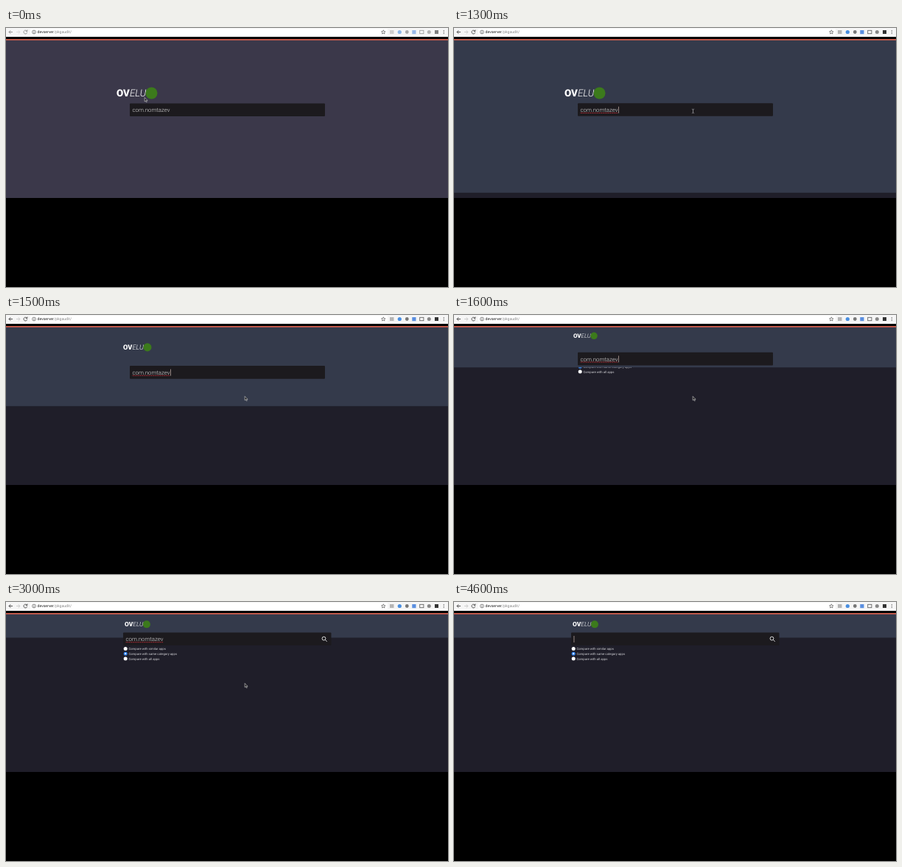
An HTML page for the animation above (5.1 s loop, 600 by 352 pixels).

```html
<!DOCTYPE html>
<html lang="en">
<head>
<meta charset="utf-8">
<title>App search</title>
<style>
  html, body { margin: 0; width: 100%; height: 100%; overflow: hidden; background: #000; }
  svg { display: block; width: 600px; height: 352px; }
  text { font-family: Roboto, "Open Sans", sans-serif; text-rendering: geometricPrecision; white-space: pre; }
  .line { fill: none; stroke: #555; stroke-width: 1; }
</style>
</head>
<body>
<svg viewBox="0 0 600 352">
  <rect width="600" height="352"/>
  <rect y="16" width="600" height="215" fill="#1f1e29"/>

  <g id="options" font-size="4.25" fill="#d4d4d8">
    <circle cy="63.5" r="2.5" fill="#fff"/>
    <text x="4.2" y="65.1">Compare with similar apps</text>
    <circle cy="70.3" r="2.5" fill="#3284ee"/>
    <circle cy="70.3" r="1" fill="#fff"/>
    <text x="4.2" y="71.9">Compare with same category apps</text>
    <circle cy="77" r="2.5" fill="#fff"/>
    <text x="4.2" y="78.6">Compare with all apps</text>
  </g>

  <rect id="panel" y="16" width="600"/>
  <rect y="15" width="600" height="1.7" fill="#d8614f"/>

  <g id="logo" fill="#fff">
    <text y="4.8" font-size="13.4"><tspan font-weight="900">OV</tspan><tspan font-weight="300" font-style="italic">ELU</tspan></text>
    <circle cx="47.5" cy=".5" r="8" fill="#3c7a1c"/>
  </g>

  <g id="field">
    <rect id="box" height="17.6" rx="1" fill="#1c1a1e"/>
    <g id="query">
      <text x="3.6" y="11.8" font-size="7.8" font-weight="300" fill="#dcdcdc">com.nomtazev</text>
      <path id="spell" d="M3.6 13.3h51" stroke="#c8323a" stroke-width=".9" stroke-dasharray="1 .5"/>
    </g>
    <rect id="caret" y="4.6" width=".7" height="9" fill="#cbb5ad"/>
    <g id="search" class="line" style="stroke:#ddd">
      <circle cy="8.2" r="2.4"/>
      <path d="M1.8 10l2.4 2.4"/>
    </g>
  </g>

  <rect width="600" height="12" fill="#f6f6f6"/>
  <rect x="33" y="1" width="485" height="9.6" rx="1" fill="#fff"/>
  <g id="tools">
    <path class="line" d="M9 5.5H4m2.3-2.3L4 5.5l2.3 2.3"/>
    <path class="line" style="stroke:#ccc" d="M14 5.5h5m-2.3-2.3L19 5.5l-2.3 2.3"/>
    <path class="line" d="M28.5 4.4a2.4 2.4 0 1 0 .2 1.8M28.9 2.5v2.1h-2.1"/>
    <rect x="521" y="3" width="5.5" height="5" fill="#b5b5b5"/>
    <circle cx="534.3" cy="5.5" r="2.6" fill="#4a8fe0"/>
    <circle cx="544.3" cy="5.5" r="2.4" fill="#777"/>
    <rect x="551.3" y="3" width="5.2" height="5.2" fill="#5b8fe0"/>
    <rect class="line" x="561.7" y="3.3" width="5.2" height="4.4" style="stroke-width:.8"/>
    <circle cx="574.3" cy="5.5" r="2.5" fill="#888"/>
    <rect x="582" y="3" width="5" height="5" fill="#333"/>
  </g>
  <circle class="line" cx="38" cy="5.5" r="2.4" style="stroke-width:.7"/>
  <path class="line" d="M38 4v.6m0 .5v2" style="stroke-width:.7"/>
  <text x="42.5" y="7.4" font-size="5.2" fill="#222">devserver<tspan fill="#888">/pkgaudit/</tspan></text>
  <path class="line" style="stroke-width:.7" d="M512.3 2.8l.8 1.8 1.9.2-1.4 1.3.4 1.9-1.7-1-1.7 1 .4-1.9-1.4-1.3 1.9-.2z"/>
  <path d="M594.3 3v1m0 1v1m0 1v1" stroke="#555" stroke-width="1.1"/>

  <path id="arrow" d="M0 0v5.4l1.3-1.1 .9 2 .9-.4-.9-1.9h1.6z" fill="#111" stroke="#ddd" stroke-width=".6"/>
  <path id="beam" class="line" style="stroke:#8a8a8e;stroke-width:.8" d="M-1.6-2.8q1.6 0 1.6.8v4q0 .8-1.6.8M1.6-2.8q-1.6 0-1.6.8v4q0 .8 1.6.8"/>
</svg>
<script>
const LOOP = 5100, STEP = 100;
const $ = id => document.getElementById(id);
const set = (id, attrs) => { for (const k in attrs) $(id).setAttribute(k, attrs[k]); };
const show = (id, on) => set(id, { visibility: on ? "visible" : "hidden" });
const move = (id, x, y, s = 1) => set(id, { transform: `translate(${x} ${y}) scale(${s})` });
const mix = (a, b, p) => a + (b - a) * p;
const swing = (t, from, to) => {
  const p = Math.min(1, Math.max(0, (t - from) / (to - from)));
  return (1 - Math.cos(Math.PI * p)) / 2;
};

function draw(t) {
  const bar = swing(t, 1241, 1707);
  const lift = swing(t, 1282, 1670);
  const shrink = swing(t, 1306, 1600);
  const widen = swing(t, 1700, 2000);
  const focused = t >= 1200, cleared = t >= 4500;

  set("panel", { height: mix(215, 32.5, bar), fill: t < 600 ? "#3b384a" : "#343a4b" });
  set("tools", { opacity: mix(.6, 1, swing(t, 0, 400)) });
  move("logo", mix(150, 162, shrink) - widen, mix(88, 28, shrink) + 2 * widen, mix(1, .59, shrink) + .04 * widen);

  const x = mix(168, 159, widen), y = mix(102.5, 46.4, lift) - 5 * widen;
  const w = mix(265, 282.5, widen);
  move("field", x, y);
  set("box", { width: w });
  move("search", w - 10, 0);
  set("search", { opacity: widen });
  move("options", x + 3.2, 0);

  show("query", !cleared);
  show("spell", focused && !cleared);
  const blink = t < 1400 || t >= 4300 || (t - 1400) % 1000 < 500;
  show("caret", focused && blink);
  set("caret", { x: cleared ? 3.6 : 55 });

  // The pointer crosses to the field, then along it
  const reach = swing(t, 0, 400), along = swing(t, 800, 1100);
  const mx = mix(188.5, 246, reach) + 78.5 * along;
  const my = mix(97, 109.3, reach) + 3.7 * along;
  const inside = my > y && my < y + 17.6;
  move("arrow", mx - .3, my - 2.5);
  move("beam", mx, my);
  show("arrow", !inside && !cleared);
  show("beam", inside && !cleared);
}

function tick() {
  draw(Math.floor(performance.now() % LOOP / STEP) * STEP);
  requestAnimationFrame(tick);
}
tick();
</script>
</body>
</html>
```
